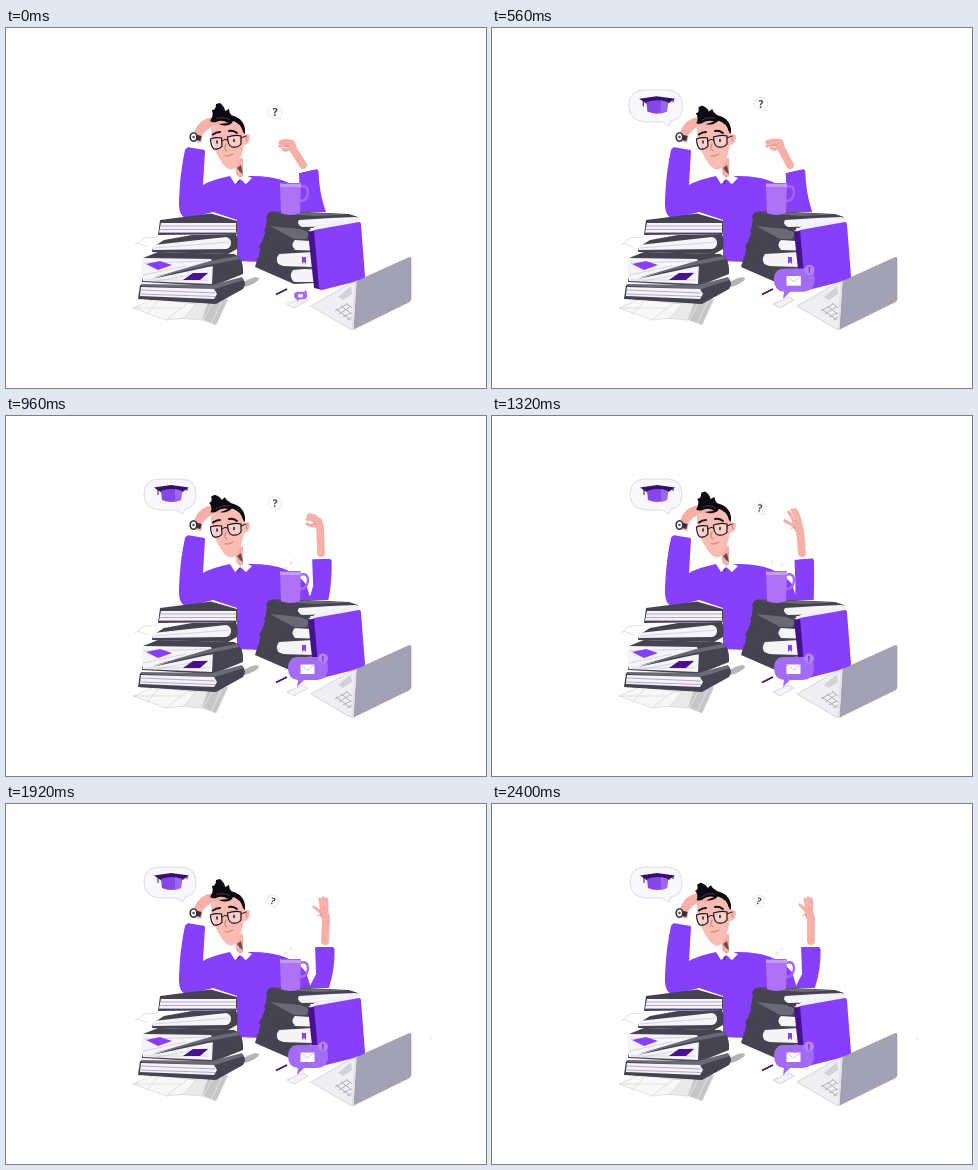
An HTML page for the animation above (2.44 s loop, 480 by 360 pixels).

```html
<!DOCTYPE html>
<html lang="en">
<head>
<meta charset="utf-8">
<title>Busy student</title>
<style>
html, body { margin: 0; width: 100%; height: 100%; overflow: hidden; background: #fff; }
svg { display: block; width: 100vw; height: 100vh; }
.p { fill: #8640fb; }
.dp { fill: #46108f; }
.d { fill: #45434f; }
.g { fill: #6c6977; }
.w { fill: #f5f4f9; }
.skin { fill: #f6b0a8; }
.k { fill: #0c0a10; }
.line { fill: none; stroke: #a590c9; stroke-width: .8; }
.edge { fill: none; stroke: #45434f; stroke-width: 1.2; stroke-linejoin: round; }
.thin { fill: none; stroke: #c9c7d0; stroke-width: .7; }
text { font-family: "Noto Sans", Arial, sans-serif; font-weight: 600; text-anchor: middle; }
</style>
</head>
<body>
<svg viewBox="0 0 480 360">
  <!-- loose papers -->
  <g stroke="#d5d4d9" stroke-width=".7" stroke-linejoin="round">
    <path fill="#c6c5c8" d="M176 273L222 271 210 297 192 290Z"/>
    <path fill="#e9e9e9" d="M158 274L202 274 196 292 172 290Z"/>
    <path fill="#f7f7f7" d="M127 280L148 271 190 276 178 290 160 292Z"/>
    <path fill="none" d="M127 280L176 280M140 287L152 273M160 292L182 275M129 217L138 210 152 209M131 215L142 219"/>
    <path stroke="#f0f0f0" fill="none" d="M196 294L207 274M205 296L216 273"/>
  </g>
  <path fill="#b5b4b7" d="M236 259Q238 251 250 249 256 250 250 254 243 259 236 259Z"/>

  <!-- torso and right arm -->
  <path class="p" d="M224 148Q205 152 197 157L199 123Q197 118 188 118 181 118 179 122 174 144 173 172 172 191 183 190 196 187 207 184L231 192 231 233 255 234 275 200 305 184 300 168Q284 148 246 148Z"/>
  <path class="p" id="sleeve"/>
  <path fill="#fff" id="cuff"/>
  <g fill="none" stroke="#f6b0a8" stroke-linecap="round" stroke-linejoin="round">
    <path id="fore" stroke-width="7.800"/>
    <path id="palm" stroke-width="8.800"/>
    <g id="fingers" stroke-width="3.200"><path/><path/><path/><path/></g>
  </g>
  <path id="crease" fill="none" stroke="#c77f7c" stroke-width=".7"/>

  <!-- left hand -->
  <path fill="#fff" d="M183 113L200 115 199 122 181 119Z"/>
  <path class="skin" d="M185 112L190 100Q195 91 206 89L212 92 204 99 197 106 195 115Z"/>

  <!-- head -->
  <path class="skin" d="M228 132L237 130 237 150 231 150Z"/>
  <path fill="#66504f" d="M231 140L235 137 237 146 234 144Z"/>
  <path fill="#fff" d="M224 148L231 147 234 150 239 147 246 150 240 156 234 152 229 156Z"/>
  <path class="p" d="M231 154L234 151 238 154 234 158Z"/>
  <path d="M233.500 152L232 156" stroke="#45206f" stroke-width=".8"/>
  <path fill="#fbbcb3" d="M205 98Q208 90 220 90 235 91 238 101L239 107Q244 104 244 110 243 117 238 117L235 129Q231 141 225 141.500 219 141 213 130 206 118 205 108Z"/>
  <path class="k" d="M224 87Q237 89 239 101L239 106 237 104Q235 95 225 92Z"/>
  <path class="skin" d="M200 95Q207 89 215 92L225 95Q222 99 216 97L207 97 203 101Z"/>
  <g id="hair">
    <path class="k" d="M204 93Q208 88 206 82 210 82 210 76L214 75Q219 79 219 83L223 81Q223 85 226 88 229 92 225 96 219 99 213 96L222 95Q216 91 210 94 207 95 204 93Z"/>
    <path d="M210 91Q217 88 224 92" fill="none" stroke="#55505b" stroke-width=".7"/>
  </g>
  <g fill="none" stroke="#16131c" stroke-linecap="round">
    <path d="M207 106.500Q210 104 214 104M223 103Q227 102 231 105" stroke-width="2"/>
    <path d="M204.500 111Q210 109 215.500 110L216 118Q213 122 208 121 205 119 204.500 111ZM221.500 109Q229 106.500 235 108L235 116Q232 120 226 119 222 118 221.500 109Z" fill="#fff3f1" fill-opacity=".35" stroke-width="1.200"/>
    <path d="M216 113Q219 110 222 112M235 110L240 108" stroke-width="1"/>
    <path d="M211 113V115M228 111.500V113.500" stroke-width="1.500"/>
    <path d="M220 116Q217 122 221 123M219 128Q223 129 227 126M241 108Q239 111 241 113" stroke="#bd716d" stroke-width=".9"/>
  </g>
  <path d="M189 109L195 110.500" stroke="#34313b" stroke-width="5"/>
  <ellipse cx="187.500" cy="109" rx="3.300" ry="4.300" fill="#fff" stroke="#34313b" stroke-width="1.600"/>
  <circle cx="187.500" cy="109" r="1.300" fill="#5b5768"/>

  <!-- left stack -->
  <path class="d" d="M154 192L205 185.500 231 193 231 206 152 207Z"/>
  <path class="w" d="M155 195H230V205H153Z"/>
  <path class="line" d="M155 198H230M154 201.500H230M153 204.500H231"/>
  <path class="d" d="M158 212L186 207 230 206Q233 213 231 221L222 226 146 224 147 219Z"/>
  <path class="w" d="M147 217L220 209Q225 210 225 215 225 220 220 221L147 222Z"/>
  <path class="thin" d="M148 220L224 214"/>
  <path class="d" d="M137 230L152 224 228 226Q238 230 237 246L207 258 136 254Z"/>
  <path class="w" d="M137 230L205 231 207 236 206 256 137 253Q133 241 137 230Z"/>
  <path class="d" d="M146 251L205 234 232 228 236 234 202 239Z"/>
  <path class="g" d="M146 250L204 233 231 228 234 231 203 237Z"/>
  <path class="thin" d="M138 235L200 233M137 247L180 238M150 253L202 244M139 252L203 252"/>
  <path class="p" d="M140 236L154 233 166 237 152 242Z"/>
  <path class="dp" d="M177 252L187 245 202 245 194 252Z"/>
  <path class="d" d="M134 257L205 257 237 251Q241 255 237 261L210 276 132 271Z"/>
  <path class="g" d="M135 256L206 257 236 249 238 252 209 261 135 258Z"/>
  <path class="w" d="M135 259L208 261 211 266 208 271 134 268Z"/>
  <path class="line" d="M135 262L209 265M135 266L209 268.500"/>
  <path class="edge" d="M132 270L208 275"/>

  <!-- right stack -->
  <path class="d" d="M261 190L259 205 255 217 252 232 290 250 308 250 304 196Z"/>
  <path class="d" d="M260 190Q261 184 266 183.500L300 184 343 186 352 189 345 195 294 201Z"/>
  <path class="g" d="M268 185L300 184.500 342 186.500 310 188Z"/>
  <path class="w" d="M293 192L325 190 350 189 354 192 345 198 296 199Q290 196 293 192Z"/>
  <path class="d" d="M258 203L262 196 294 200 304 202 304 224 290 225Z"/>
  <path class="g" d="M264 198L294 201 304 205 300 211 288 211Z"/>
  <path class="w" d="M289 212L304 213V223L289 222Q284 216 289 212Z"/>
  <path class="d" d="M253 219Q254 214 260 212L286 222 308 226V241L274 239Z"/>
  <path class="w" d="M273 226L307 224V239L274 238Q268 232 273 226Z"/>
  <path class="p" d="M296 229H300V236L298 234 296 236Z"/>
  <path class="d" d="M249 239L252 229 286 241 308 242V255L288 256Z"/>
  <path class="w" d="M287 242L308 240V254L288 254Q282 248 287 242Z"/>
  <path class="edge" d="M293 200L345 198M288 223H304M273 239L307 241"/>

  <!-- mug -->
  <path d="M294 159Q302 156 302 165 301 173 294 173" fill="none" stroke="#a369f3" stroke-width="2.300"/>
  <path fill="#ad72f6" d="M274 155H295L294 185Q284 189 275 185Z"/>
  <path fill="#c69af8" d="M274 155H295V159H274Z"/>
  <path d="M275 155.500H294" stroke="#9157dd" stroke-width=".8"/>
  <path id="steam" fill="none" stroke="#c4bccf" stroke-width=".8" stroke-linecap="round"/>

  <!-- purple book -->
  <path fill="#f1eff8" d="M302 203L310 198 350 190 355 195 309 204Z"/>
  <path class="dp" d="M302 204L310 202 317 262 308 260Z"/>
  <path class="p" d="M308 202L353 194Q355 194 355 197L359 248Q359 251 356 252L316 262Q313 262 313 259Z"/>

  <!-- laptop, pen, phone -->
  <path fill="#efeff2" stroke="#c9c8d0" stroke-width=".7" d="M305 278L343 256 352 252.500 348 301.500 344 301Z"/>
  <path d="M329 283L341 276M333 286L344 279M337 289L345 285M341 292L346 289M330 281L345 292M335 278L346 286M340 275L346 280" stroke="#a9a7b5" stroke-width=".9"/>
  <path fill="#d3d2da" d="M332 269L345 258 346 266 337 272Z"/>
  <path fill="#a3a2b4" stroke="#8d8b9d" stroke-width=".5" stroke-linejoin="round" d="M351 253L403 229.500Q405 228.500 405 231V271Q405 273 403 274L348 301Z"/>
  <path d="M349.500 254L346.500 301" stroke="#e2e1e7" stroke-width="1.800"/>
  <path d="M270 266.500L281 261" stroke="#3a155f" stroke-width="1.900"/>
  <path fill="#f4f3f7" stroke="#c9c7d2" stroke-width=".7" d="M281 276L297 269 302 272 288 280Z"/>

  <!-- message bubble -->
  <g id="mail">
    <path fill="#a36cf4" d="M294 241H311Q322 241 322 252 322 263 311 264L298 264 291 271 292 264Q282 263 282 252 282 241 294 241Z"/>
    <circle cx="317" cy="242.500" r="5" fill="#b385f4"/>
    <text x="317" y="245.500" font-size="8" fill="#6c31c2">!</text>
    <path fill="#fff" d="M294.500 248.500H308.500V258H294.500Z"/>
    <path fill="none" stroke="#b9a6d8" stroke-width=".7" d="M295 249L301.500 254 308 249"/>
  </g>

  <!-- cap bubble -->
  <g id="idea">
    <path fill="#f8f7fb" stroke="#dad7e4" stroke-width=".9" d="M154 63H174Q190 63 190 78 190 92 179 93L177 98 170 94H154Q138 93 138 78 138 63 154 63Z"/>
    <path fill="#35106b" d="M148 71.500L165 69 183 71.500 175 77 156 77Z"/>
    <path fill="#8448e8" d="M155 75Q165 71 176 75L175 84Q165 88 156 84Z"/>
    <path fill="#9a68f0" d="M169 73L176 75 175 84 169 86Z"/>
    <path d="M152 72V79M181 72V75" stroke="#35106b" stroke-width="1"/>
  </g>

  <!-- question bubble -->
  <g id="ask">
    <path fill="#fdfdff" stroke="#e4e2ec" stroke-width=".8" d="M0-6.700Q7-6.500 7 0 7 3 5 4.500L5.500 7 2 6Q-7 7-7 0-7-6.500 0-6.700Z"/>
    <text y="4" font-size="11" fill="#47415f">?</text>
  </g>
  <circle id="speck" cx="425" cy="234.500" r=".6" fill="#b9b7c0"/>
</svg>
<script>
const LOOP = 2440, STEP = 40;
const $ = id => document.getElementById(id);
const set = (el, name, v) => el.setAttribute(name, v);
const smooth = u => u * u * (3 - 2 * u);
const same = u => u;
const fingers = [...$('fingers').children];

// rows: time, then the values at that time
function track(rows, t, ease) {
  const i = rows.findIndex(r => r[0] > t);
  if (i < 0) return rows[rows.length - 1].slice(1);
  if (!i) return rows[0].slice(1);
  const a = rows[i - 1], b = rows[i];
  const u = ease((t - a[0]) / (b[0] - a[0]));
  return a.slice(1).map((v, k) => v + (b[k + 1] - v) * u);
}

// time, palm x y, thumb dx dy, middle finger dx dy, finger spread, arm base x
const ARM = [
  [0, 285, 116, -8, 5, -11, -1, 2.2, 297],
  [560, 287, 115, -8, 5, -12, 0, 2.2, 298],
  [960, 312, 106, -11, 2, -10, -6, 2.4, 315],
  [1320, 306, 110, -13, -5, -6, -16, 3.5, 310],
  [1600, 306, 109, -13, 0, -10, -5, 2.2, 310],
  [1920, 318, 109, -10, -6, -1, -15, 3.2, 319],
  [2400, 317, 109, -9, -8, -1, -15, 3, 319]
];
const HAIR = [[0, 0], [560, .7], [960, 1], [1320, .15], [1600, 0], [1920, 0], [2400, 1]];
const ASK = [
  [0, 269, 84, 1, 0], [560, 269, 76, .95, 0], [960, 269, 87, .94, 2],
  [1320, 268, 92, .92, 8], [1600, 268, 94, .9, 11], [1920, 267, 97, .85, 18]
];
const IDEA = [[0, 0], [80, 0], [400, 1.06], [560, 1.03], [840, 1]];
const MAIL = [[0, .33], [360, 1.06], [560, 1.02], [840, 1]];

function zoom(id, s, x, y) {
  set($(id), 'transform', `translate(${x} ${y}) scale(${s}) translate(${-x} ${-y})`);
}

function drawArm(t) {
  const [px, py, tx, ty, fx, fy, gap, bx] = track(ARM, t, smooth);
  const c = 303 + (bx - 297) * .73;
  const tilt = (319 - bx) / 11;
  const foot = 320 + (bx - 297) * .13;
  set($('sleeve'), 'd', `M${c - 10} ${143 + tilt}Q${c} ${142} ${c + 8} ${143 - tilt}L${c + 9.5} ${145 - tilt}Q${c + 10} 165 ${foot} 184L303 184 ${c - 9} 170Z`);
  set($('cuff'), 'd', `M${bx - 6} ${138 + tilt}L${bx + 6} ${138 - tilt / 2} ${c + 8} ${143 - tilt} ${c - 10} ${143 + tilt}Z`);
  set($('fore'), 'd', `M${bx} 137L${px + 2} ${py + 5}`);
  set($('palm'), 'd', `M${px} ${py}L${px + 1} ${py + 3}`);

  const len = Math.hypot(fx, fy), nx = -fy / len, ny = fx / len;
  for (let i = 0; i < 3; i++) {
    const k = (i - 1) * gap;
    const x = px + fx + nx * k, y = py + fy + ny * k + (i === 1 ? 0 : 1);
    set(fingers[i], 'd', `M${px + nx * k * .8} ${py + ny * k * .8}Q${px + fx * .45 + nx * k + 1} ${py + fy * .5 + ny * k - 2} ${x} ${y}`);
  }
  set(fingers[3], 'd', `M${px} ${py + 3}Q${px + tx * .5} ${py + ty + 3} ${px + tx} ${py + ty}`);
  set($('crease'), 'd', `M${px - 2} ${py + 2}q-3 -1 -5 1M${px + fx * .5} ${py + fy * .5 + 2}l1.500 1.500`);
}

function drawSteam(t) {
  let d = '';
  if (t > 720) for (let i = 0; i < 3; i++) {
    const u = (t / 800 + i * .37) % 1;
    const len = 2.5 * Math.sin(Math.PI * u);
    d += `M${280 + i * 5} ${155 - u * 12}q1 ${-len / 2} 0 ${-len}`;
  }
  set($('steam'), 'd', d);
}

function draw(t) {
  drawArm(t);
  drawSteam(t);
  const [w] = track(HAIR, t, smooth);
  set($('hair'), 'transform', `translate(216 93) scale(1 ${1 - .14 * w}) rotate(${-18 * w}) translate(-216 -93)`);
  const [x, y, s, turn] = track(ASK, t, same);
  set($('ask'), 'transform', `translate(${x} ${y}) rotate(${turn}) scale(${s})`);
  zoom('idea', track(IDEA, t, smooth)[0], 177, 98);
  zoom('mail', track(MAIL, t, smooth)[0], 291, 275 - 3 * Math.min(1, t / 360));
  set($('speck'), 'opacity', t >= 1760 ? 1 : 0);
}

const start = performance.now();
function tick() {
  const t = (performance.now() - start) % LOOP;
  draw(Math.floor(t / STEP) * STEP);
  requestAnimationFrame(tick);
}
tick();
</script>
</body>
</html>
```
